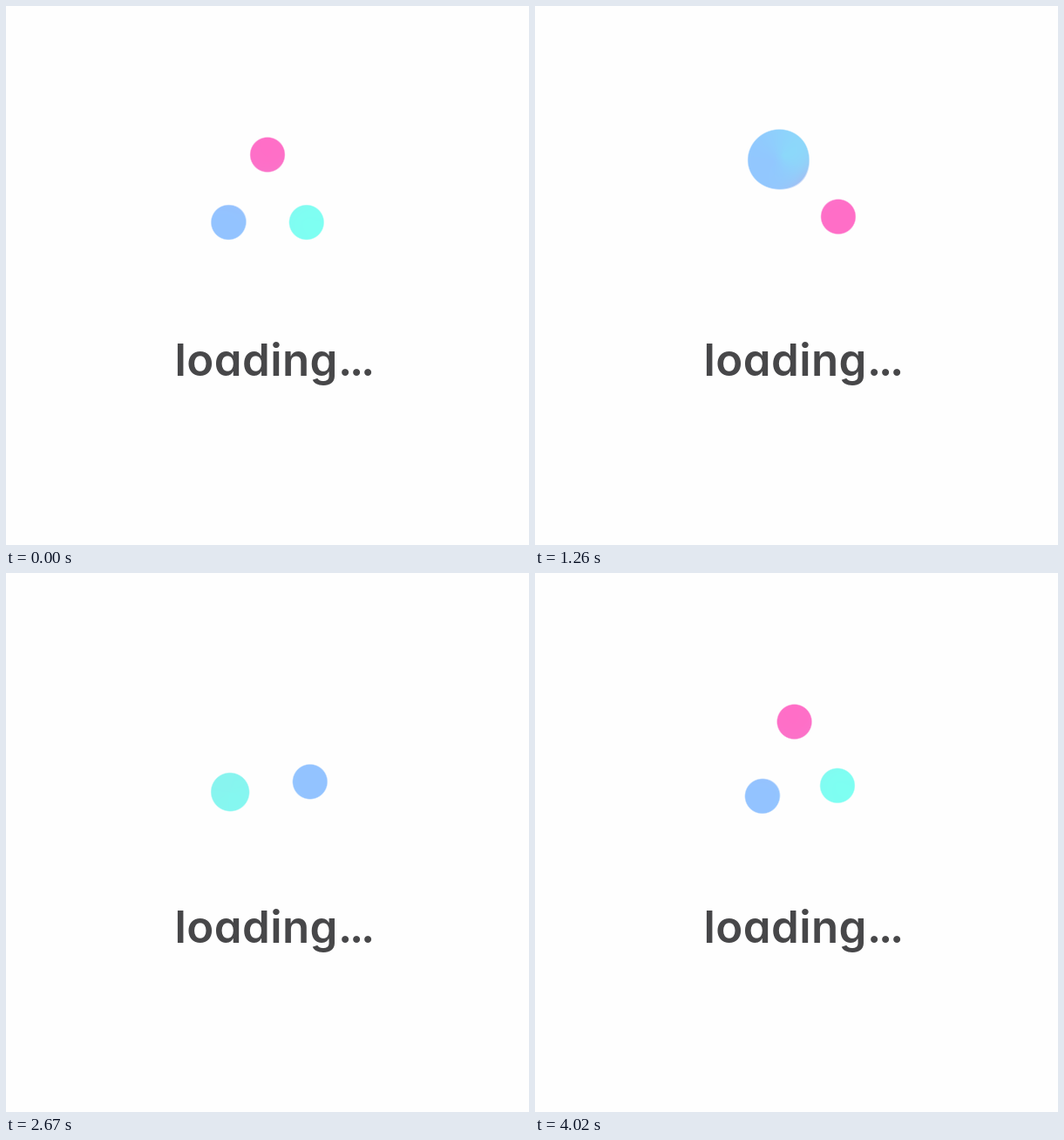
Recreate the animation shown at these times as an HTML page with a canvas. Size 600 px wide and 618 px high, loop 4.05 s.

```html
<!DOCTYPE html>
<html lang="en">
<head>
<meta charset="utf-8">
<title>Loading</title>
<style>
  html, body { margin: 0; width: 100%; height: 100%; overflow: hidden; background: #fefefe; }
  canvas { position: absolute; left: 200px; top: 120px; }
  p {
    position: absolute; left: 193.6px; top: 376px; margin: 0;
    font: 620 51px/60px Inter, Lato, sans-serif;
    font-feature-settings: "cv11", "ss03";
    letter-spacing: 0.4px; white-space: nowrap; color: #474749;
  }
  span { letter-spacing: -3.2px; }
</style>
</head>
<body>
<canvas id="stage" width="200" height="200"></canvas>
<p>loading<span>...</span></p>
<script>
const LOOP = 4050, STEP = 30;
const LEFT = 200, TOP = 120, SIZE = 200;
const CX = 300, CY = 222.2, ORBIT = 51.7, RADIUS = 19.9;
const BACK = 254, SOFT = 14;

// Listed from the bottom layer to the top one; turns are per loop.
const balls = [
  { start: 0,   turns: 1, rgb: [255, 110, 199] },
  { start: 120, turns: 2, rgb: [126, 255, 242] },
  { start: 240, turns: 4, rgb: [147, 195, 255] }
];

// Changes of the merging strength around the meetings: time, amount, width.
const swells = [
  [450, 18, 110], [1350, 18, 100], [1800, 18, 100],
  [2700, -43, 180], [3150, 10, 100]
];

const ctx = document.getElementById("stage").getContext("2d");
const image = ctx.createImageData(SIZE, SIZE);

const bell = x => Math.exp(-x * x);

function merge(a, b, k) {
  const h = Math.max(0, 1 - Math.abs(a - b) / k);
  return Math.min(a, b) - h * h * k / 4;
}

function place(t) {
  for (const b of balls) {
    const angle = (b.start + 360 * b.turns * t / LOOP) * Math.PI / 180;
    b.x = CX + ORBIT * Math.sin(angle) - LEFT;
    b.y = CY - ORBIT * Math.cos(angle) - TOP;
  }
  // A ball fades under one lying above it.
  balls.forEach((b, i) => {
    b.weight = 1;
    for (const over of balls.slice(i + 1)) {
      b.weight *= Math.exp(-2.7 * bell(Math.hypot(b.x - over.x, b.y - over.y) / 20));
    }
  });
}

function draw(t) {
  place(t);
  const k = swells.reduce((sum, [at, amount, width]) => sum + amount * bell((t - at) / width), 50);
  const data = image.data;
  const dist = [0, 0, 0];
  for (let y = 0, p = 0; y < SIZE; y++) {
    for (let x = 0; x < SIZE; x++, p += 4) {
      balls.forEach((b, i) => {
        dist[i] = Math.hypot(x + 0.5 - b.x, y + 0.5 - b.y) - RADIUS;
      });
      const edge = merge(merge(dist[0], dist[1], k), dist[2], k);
      const cover = Math.min(1, Math.max(0, 0.5 - edge / 1.4));
      let r = 0, g = 0, bl = 0, total = 0;
      if (cover > 0) {
        balls.forEach((b, i) => {
          const w = b.weight * Math.exp(-dist[i] / SOFT);
          r += w * b.rgb[0];
          g += w * b.rgb[1];
          bl += w * b.rgb[2];
          total += w;
        });
      } else {
        total = 1;
      }
      const rest = BACK * (1 - cover);
      data[p] = r / total * cover + rest;
      data[p + 1] = g / total * cover + rest;
      data[p + 2] = bl / total * cover + rest;
      data[p + 3] = 255;
    }
  }
  ctx.putImageData(image, 0, 0);
}

let shown = -1;
function tick(now) {
  const t = Math.floor((now % LOOP) / STEP) * STEP;
  if (t !== shown) draw(shown = t);
  requestAnimationFrame(tick);
}
draw(0);
requestAnimationFrame(tick);
</script>
</body>
</html>
```
